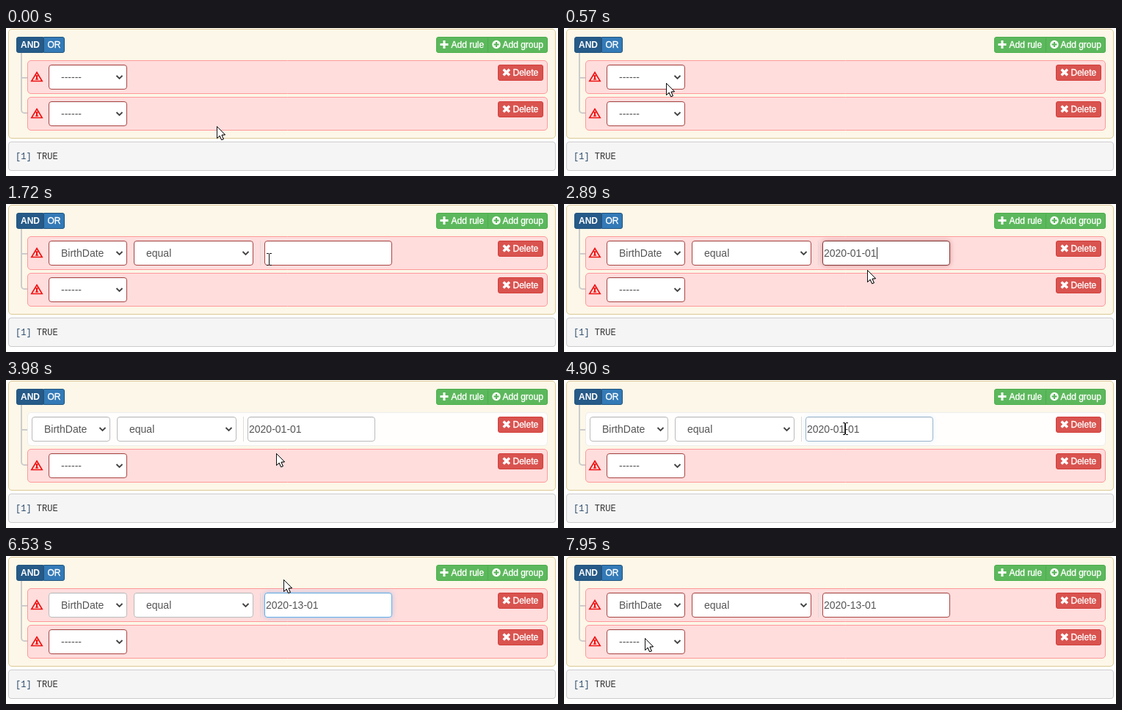
These frames come from a looping animation (752x202 px, 8000 ms). An HTML page with a canvas:

```html
<!DOCTYPE html>
<html lang="en">
<head>
<meta charset="utf-8">
<title>Query builder</title>
<style>
html, body { margin: 0; width: 752px; height: 202px; overflow: hidden; background: #fff; }
canvas { display: block; }
</style>
</head>
<body>
<canvas id="stage" width="752" height="202"></canvas>
<script>
const c = document.getElementById('stage').getContext('2d', { alpha: false });
const LOOP = 8000, STEP = 78;
const UI = '12px "Liberation Sans", Arial, sans-serif';
const FIELD = UI.replace('12', '14');
const MONO = '12px "Liberation Mono", monospace';
const TEXT = '#555555', RED = '#a94442', GREY = '#bbbbbb';

// moments of the story, in ms
const OPEN = 700, HOVER = 1030, PICK = 1180, FOCUS = 1840, PASTE = 2500, LEAVE = 3650;
const REFOCUS = 4900, SELECT = 4980, SELECT_MORE = 5290, TYPE_1 = 5750, TYPE_3 = 5900, REJECT = 6525;

// pointer moves: first step, last step, x, y
const MOVES = [
  [70, 600, 118, 66], [740, HOVER, 107, 103], [1260, 1800, 441, 66],
  [2660, 2890, 413, 90], [3280, 3510, 388, 159], [3910, 3980, 368, 100],
  [4060, 4290, 394, 66], [4440, 4750, 383, 66], [SELECT, SELECT_MORE, 367, 66],
  [6210, 6450, 378, 32], [6840, 7080, 437, 88], [7160, 7630, 384, 70], [7870, 7950, 110, 112]
];

const within = (v, a, b) => v >= a && v < b;
const ramp = (t, a, b) => Math.min(1, Math.max(0, (t - a) / (b - a)));

function mix(a, b, k) {
  const part = (s, i) => parseInt(s.substr(1 + 2 * i, 2), 16);
  return 'rgb(' + [0, 1, 2].map(i => Math.round(part(a, i) + (part(b, i) - part(a, i)) * k)) + ')';
}

function pointerAt(t) {
  let x = 287, y = 134;
  for (const [a, b, tx, ty] of MOVES) {
    if (t < a) break;
    const gaps = Math.round((b - a) / STEP);
    const done = Math.floor((t - a) / (b - a) * gaps + 0.01) + 1;
    const k = Math.min(1, done / (gaps + 1));
    x += (tx - x) * k;
    y += (ty - y) * k;
  }
  return { x: Math.round(x), y: Math.round(y) };
}

function box(x, y, w, h, r, fill, line) {
  const radii = [].concat(r).map(v => Math.max(0, v - 0.5));
  c.beginPath();
  c.roundRect(x + 0.5, y + 0.5, w - 1, h - 1, radii);
  c.fillStyle = fill;
  c.fill();
  c.shadowColor = 'transparent';
  c.strokeStyle = line;
  c.lineWidth = 1;
  c.stroke();
}

function text(s, x, y, font, color) {
  c.font = font;
  c.fillStyle = color;
  c.fillText(s, x, y);
}

// white button text, slightly heavier than regular
function label(s, x, y) {
  text(s, x, y, UI, '#fff');
  c.strokeStyle = '#fff';
  c.lineWidth = 0.35;
  c.strokeText(s, x, y);
}

function lines(points, color, width, closed) {
  c.beginPath();
  points.forEach(p => c.lineTo(...p));
  if (closed) c.closePath();
  c.strokeStyle = color;
  c.lineWidth = width;
  c.stroke();
}

function plus(x, y, r, w, color) {
  lines([[x - r, y], [x + r, y]], color, w);
  lines([[x, y - r], [x, y + r]], color, w);
}

function frame() {
  c.fillStyle = '#fff';
  c.fillRect(0, 0, 752, 202);
  box(3, 1, 746, 150, 5, '#fcf7e8', '#dcc896');
  box(3, 155, 746, 40, 4, '#f5f5f5', '#cccccc');
  text('[1]', 13, 179, MONO, '#2c4a6a');
  text('TRUE', 41.8, 179, MONO, '#333');

  lines([[20, 68], [30, 68]], '#ccc', 2);
  c.beginPath();
  c.moveTo(21, 33);
  c.arcTo(21, 116, 25, 116, 4);
  c.lineTo(30, 116);
  c.stroke();

  box(14, 12, 37, 22, [3, 0, 0, 3], '#265a88', '#245580');
  box(51, 12, 29, 22, [0, 3, 3, 0], '#337ab7', '#245580');
  text('AND', 20, 27, 'bold ' + UI, '#fff');
  label('OR', 56.5, 27);

  box(586, 12, 71, 22, [3, 0, 0, 3], '#5cb85c', '#4cae4c');
  box(656, 12, 82, 22, [0, 3, 3, 0], '#5cb85c', '#4cae4c');
  plus(597, 22.5, 5.5, 3, '#fff');
  label('Add rule', 606.5, 27);
  c.beginPath();
  c.arc(668, 22.5, 5.7, 0, 7);
  c.fillStyle = '#fff';
  c.fill();
  plus(668, 22.5, 3.5, 2.2, '#5cb85c');
  label('Add group', 676.5, 27);
}

function warning(x, y) {
  const red = '#ee1010';
  lines([[x, y - 6], [x + 7.2, y + 6], [x - 7.2, y + 6]], red, 1.6, true);
  lines([[x, y - 2], [x, y + 4]], red, 2);
  for (const bar of [y - 1.5, y + 3.5]) lines([[x - 2.3, bar], [x + 2.3, bar]], red, 1.1);
}

function row(y, bad) {
  box(29, y, 709, 46, 5, bad ? '#ffdddd' : '#fffefd', bad ? '#ff9999' : '#eeeeee');
  if (bad) warning(42, y + 22.5);
  box(670, y + 6, 62, 22, 3, '#d9534f', '#d43f3a');
  c.save();
  c.translate(681.8, y + 16.5);
  c.rotate(Math.PI / 4);
  plus(0, 0, 5.8, 3.5, '#fff');
  c.restore();
  label('Delete', 690.5, y + 21);
}

// err: 0 valid to 1 invalid; focus: 0 to 1
function field(x, y, w, err, focus) {
  const bad = err > 0.5;
  const lit = bad ? '#843534' : '#66afe9';
  c.save();
  c.shadowBlur = focus ? 7 : 0;
  c.shadowColor = bad ? `rgba(206,132,131,${focus})` : `rgba(102,175,233,${0.6 * focus})`;
  box(x, y, w, 34, 4, '#fff', focus ? mix(bad ? RED : GREY, lit, focus) : mix(GREY, RED, err));
  c.restore();
  c.fillStyle = 'rgba(0,0,0,.06)';
  c.fillRect(x + 3, y + 1, w - 6, 1);
}

function select(x, y, w, value, err, focus) {
  field(x, y, w, err, focus);
  text(value, x + 17, y + 22, FIELD, TEXT);
  const ax = x + w - 10.5, ay = y + 19;
  lines([[ax - 4, ay - 4], [ax, ay], [ax + 4, ay - 4]], '#444', 1.9);
}

function caretOn(t) {
  const focused = within(t, FOCUS, LEAVE) || within(t, REFOCUS, REJECT);
  const reset = [TYPE_3, TYPE_1, REFOCUS, PASTE, FOCUS].find(s => t >= s);
  return focused && Math.floor((t - reset) / 490) % 2 === 0;
}

function input(t, x, err, focus) {
  field(x, 50, 174, err, focus);
  const month = t < TYPE_1 ? '01' : t < TYPE_3 ? '1' : '13';
  const value = t < PASTE ? '' : `2020-${month}-01`;
  const left = x + 2;
  text(value, left, 72, FIELD, TEXT);
  const at = n => left + c.measureText(value.slice(0, n)).width;
  if (within(t, SELECT, TYPE_1)) {
    const a = at(t < SELECT_MORE ? 6 : 5), b = at(7);
    c.save();
    c.beginPath();
    c.rect(a, 59, b - a, 16);
    c.clip();
    c.fillStyle = '#3390ff';
    c.fillRect(a, 59, b - a, 16);
    text(value, left, 72, FIELD, '#fff');
    c.restore();
  } else if (caretOn(t)) {
    c.fillStyle = '#333';
    c.fillRect(Math.round(at(t < REFOCUS ? value.length : 5 + month.length)), 59, 1, 16);
  }
}

function menu(active) {
  c.save();
  c.beginPath();
  c.rect(0, 84, 752, 118);
  c.clip();
  c.shadowColor = 'rgba(0,0,0,.3)';
  c.shadowBlur = 48;
  c.shadowOffsetY = 18;
  box(58, 85, 107, 54, 5, '#fff', '#d8d0d0');
  c.beginPath();
  c.roundRect(58, 85, 107, 54, 5);
  c.clip();
  c.fillStyle = '#1967d2';
  c.fillRect(58, 85 + 18 * active, 107, 18);
  ['------', 'BirthDate', 'Name'].forEach((s, i) =>
    text(s, 75, 98 + 18 * i, FIELD, i === active ? '#fff' : TEXT));
  c.restore();
}

function arrow(x, y) {
  c.save();
  c.translate(x + 0.5, y + 0.5);
  lines([[0, 0], [0, 16], [3.7, 12.6], [6.2, 18.2], [8.8, 17.1], [6.4, 11.6], [11, 11.2]], '#111', 1, true);
  c.fillStyle = '#fff';
  c.fill();
  c.stroke();
  c.restore();
}

function beam(x, y) {
  c.fillStyle = '#111';
  c.fillRect(x, y - 7, 1, 15);
  for (const end of [y - 8, y + 8]) {
    c.fillRect(x - 3, end, 3, 1);
    c.fillRect(x + 1, end, 3, 1);
  }
}

function draw(t) {
  const bad = !within(t, LEAVE, REJECT);
  const filled = t >= PICK;
  const calm = ramp(t, LEAVE - 10, LEAVE + 90);
  const alarm = ramp(t, REJECT + 75, REJECT + 155);
  const err = 1 - calm + alarm;
  const focus = ramp(t, FOCUS, FOCUS + 110) - calm + ramp(t, REFOCUS - 60, REFOCUS + 100) - alarm;
  const dx = bad ? 0 : -23;

  frame();
  row(44, bad);
  row(94, true);
  select(58, 100, 107, '------', 1, 0);
  select(58 + dx, 50, 107, filled ? 'BirthDate' : '------', err, within(t, 600, 1260) ? 1 : 0);
  if (filled) {
    select(174 + dx, 50, 163, 'equal', err, 0);
    c.fillStyle = '#ddd';
    c.fillRect(346 + dx, 50, 1, 34);
    input(t, 352 + dx, err, focus);
  }
  if (within(t, OPEN, PICK)) menu(t < HOVER ? 0 : 1);

  const p = pointerAt(t), left = 352 + dx;
  const overInput = filled && within(p.x, left, left + 174) && within(p.y, 50, 84);
  (overInput ? beam : arrow)(p.x, p.y);
}

const start = performance.now();
function tick() {
  draw((performance.now() - start) % LOOP);
  requestAnimationFrame(tick);
}
tick();
</script>
</body>
</html>
```
